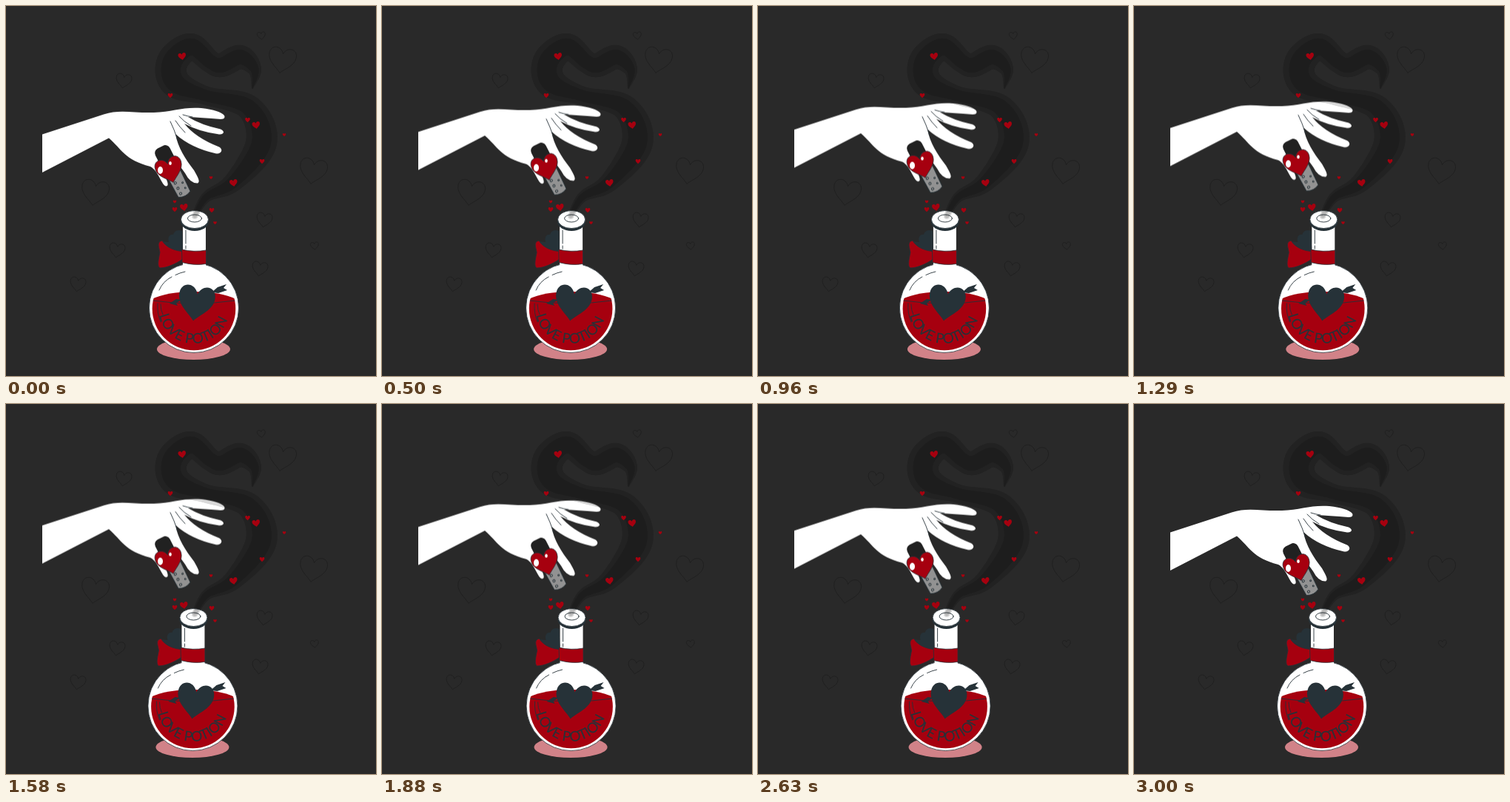
Write an HTML page that moves like this. It is 500 by 500 pixels and loops after 3.04 s.

```html
<!DOCTYPE html>
<html lang="en">
<head>
<meta charset="utf-8">
<title>Love potion</title>
<style>
  html, body { margin: 0; width: 100%; height: 100%; overflow: hidden; background: #292929; }
  svg { display: block; width: 100vw; height: 100vh; }
  .line { fill: none; stroke: #263238; stroke-width: .9; stroke-linecap: round; stroke-linejoin: round; }
  .red { fill: #a6000f; }
  .ink { fill: #263238; }
  .white { fill: #fff; }
  .edge { stroke: #263238; stroke-width: .8; }
  #ghosts { fill: none; stroke: #202020; }
  #smoke g { opacity: .15; }
  .label { font: 19px Lato, "Open Sans", sans-serif; text-anchor: middle; }
  #hand { animation: float 3.04s linear -10ms infinite; }
  #bottle { animation: shake 3.04s linear -10ms infinite; }
  /* three seconds of motion, then a short hold */
  @keyframes float {
    0%, 98.7%, 100% { transform: translateY(0); }
    49.35% { transform: translateY(-10px); }
  }
  @keyframes shake {
    0%, 98.7%, 100% { transform: translateX(0); }
    9.87%, 88.8% { transform: translateX(-1px); }
    19.74%, 78.95% { transform: translateX(2px); }
    29.6%, 49.35%, 69.1% { transform: translateX(-4px); }
    39.5%, 59.2% { transform: translateX(4px); }
  }
</style>
</head>
<body>
<svg viewBox="0 0 500 500" xmlns="http://www.w3.org/2000/svg">
  <defs>
    <path id="heart" vector-effect="non-scaling-stroke" d="M0 .95C-.3 .6-1 .25-1-.35C-1-1-.2-1.05 0-.45C.2-1.05 1-1 1-.35C1 .25 .3 .6 0 .95Z"/>
    <path id="arc" d="M206 408A48 48 0 0 0 302 408"/>
    <clipPath id="inside"><circle cx="254" cy="409" r="56.3"/></clipPath>
  </defs>

  <g id="ghosts"></g>

  <g id="bottle">
    <ellipse cx="253.5" cy="463.7" rx="49.5" ry="14.3" fill="#d18288"/>
    <circle class="white edge" cx="254" cy="408" r="60.5"/>
    <path class="white" d="M239 294H270V352H239Z"/>
    <path class="line" d="M243 303V321M243 324V328"/>

    <g clip-path="url(#inside)">
      <path class="red" d="M190 400Q212 386 254 386T318 400V480H190Z"/>
      <path class="line" d="M198 398Q254 406 310 398M205 402Q204 415 209 427M209 403Q209 411 212 417"/>
    </g>
    <path class="line" d="M207 384Q212 372 224 366M229 363.5Q235 360.5 242 359"/>

    <use href="#heart" class="ink" transform="translate(257 401) rotate(9) scale(24.5 26)"/>
    <path class="ink" d="M221 402L230 396L237 397L230 401.5L232 405ZM278 387L286 380L298 376L294 381L299 384L287 388Z"/>
    <text class="label ink"><textPath href="#arc" startOffset="48%">LOVE POTION</textPath></text>

    <path class="ink" d="M239 331L238 304C231 301 227 305 226 309C221 308 218 313 220 319L209 318C214 328 226 332 239 331Z"/>
    <path class="red edge" d="M239 331.5C228 331 216 326 211 317C203 319 207 326 208 333C206 343 204 352 208 354C218 354 230 348 239 342Z"/>
    <path class="red edge" d="M237.500 329Q254 333 270.500 330V348.500Q254 351 238 346.500Z"/>

    <ellipse class="ink" cx="255" cy="291.5" rx="19" ry="12.5"/>
    <ellipse class="white edge" cx="255" cy="288.5" rx="18.5" ry="12"/>
    <ellipse class="line" cx="255" cy="287" rx="9.5" ry="5"/>
  </g>

  <g id="hand">
    <path class="white" d="M49 173.500L132 146.500C154 139 172 145 200 144C225 143 240 136 264 138Q289 141 295 148Q297 153 290 153Q264 151 246 150Q264 161 290 166.500C296 169 295 174 288 173.500Q261 170 241 159Q256 178 288 190.500C294 194 291 200 284 199.500Q250 192 229 173C232 191 243 208 254 222C259 231 263 237 259 239.500Q249 240 242 226L216 190L211 221C213 229 221 239 218 243C211 247 208 224 195 217C160 208 156 193 139 178.500L49 225Z"/>
    <path class="line" d="M222 156Q227 166 232 181M229 155Q234 163 242 171M234 149Q240 156 250 162M239 147Q245 149 252 150"/>
    <g transform="translate(226 225) rotate(-27)">
      <rect x="-11" y="-38.500" width="22" height="42" rx="7" fill="#212121"/>
      <path class="edge" fill="#929292" d="M-10 2H10L9 33Q0 38-9 33Z"/>
      <g id="pores" class="line"></g>
    </g>
    <use href="#heart" class="red edge" transform="translate(221 221.5) rotate(-17) scale(18.2 18.7)"/>
    <ellipse class="white" cx="208.5" cy="222" rx="3.5" ry="5"/>
    <ellipse class="white" cx="222" cy="212.500" rx="1.8" ry="2.5"/>
  </g>

  <g id="smoke"></g>
  <g id="sparks" class="red"></g>
</svg>
<script>
  const add = (id, markup) => document.getElementById(id).insertAdjacentHTML("beforeend", markup);
  const points = text => text.split(" ").map(pair => pair.split(",").map(Number));

  // hearts of one width at each point
  function scatter(id, width, tilt, places) {
    for (const [x, y] of points(places))
      add(id, `<use href="#heart" transform="translate(${x} ${y}) rotate(${tilt}) scale(${width / 2})"/>`);
  }

  scatter("ghosts", 37, 10, "373,73 415,223 120,252");
  scatter("ghosts", 21, 9, "159,101 349,289 343,355 97,376 150,330");
  scatter("ghosts", 11, -6, "345,40 417,324");
  scatter("sparks", 10.5, -9, "238,68 338,161 307.5,239 240.5,272");
  scatter("sparks", 6.7, 0, "222,121 326.5,154 346,210 228,275 278,276");
  scatter("sparks", 4.5, 0, "376,174 277,232 228,264.5 282.5,293");

  // centre and half-width along the plume, joined by a Catmull-Rom curve
  const plume = points("255,284,4 271,258,7 307,238,13 345,185,21 328,137,17 270,121,12.5 " +
    "229,104,20 225,75,21 250,55,18 276,75,15 291,80,16 317,69,16 336,86,9 333,111,1");

  function curve(list, position) {
    const i = Math.min(Math.floor(position), list.length - 2), t = position - i;
    const at = k => list[Math.max(0, Math.min(list.length - 1, k))];
    const [a, b, c, d] = [at(i - 1), at(i), at(i + 1), at(i + 2)];
    return b.map((v, n) => v + t / 2 * (c[n] - a[n]
      + t * (2 * a[n] - 5 * v + 4 * c[n] - d[n] + t * (3 * (v - c[n]) + d[n] - a[n]))));
  }

  function ribbon(scale) {
    const steps = 300;
    let dots = "";
    for (let s = 0; s <= steps; s++) {
      const [x, y, r] = curve(plume, s / steps * (plume.length - 1));
      dots += `<circle cx="${x}" cy="${y}" r="${Math.max(0, r * scale)}"/>`;
    }
    add("smoke", `<g>${dots}</g>`);
  }

  ribbon(1);
  ribbon(.62);

  // cork pores zigzag down the stopper
  for (let i = 0; i < 5; i++)
    add("pores", `<circle cx="${i % 2 ? 5 : -4}" cy="${14 + i * 4}" r="${i % 2 ? 1 : 1.6}"/>`);
</script>
</body>
</html>
```
